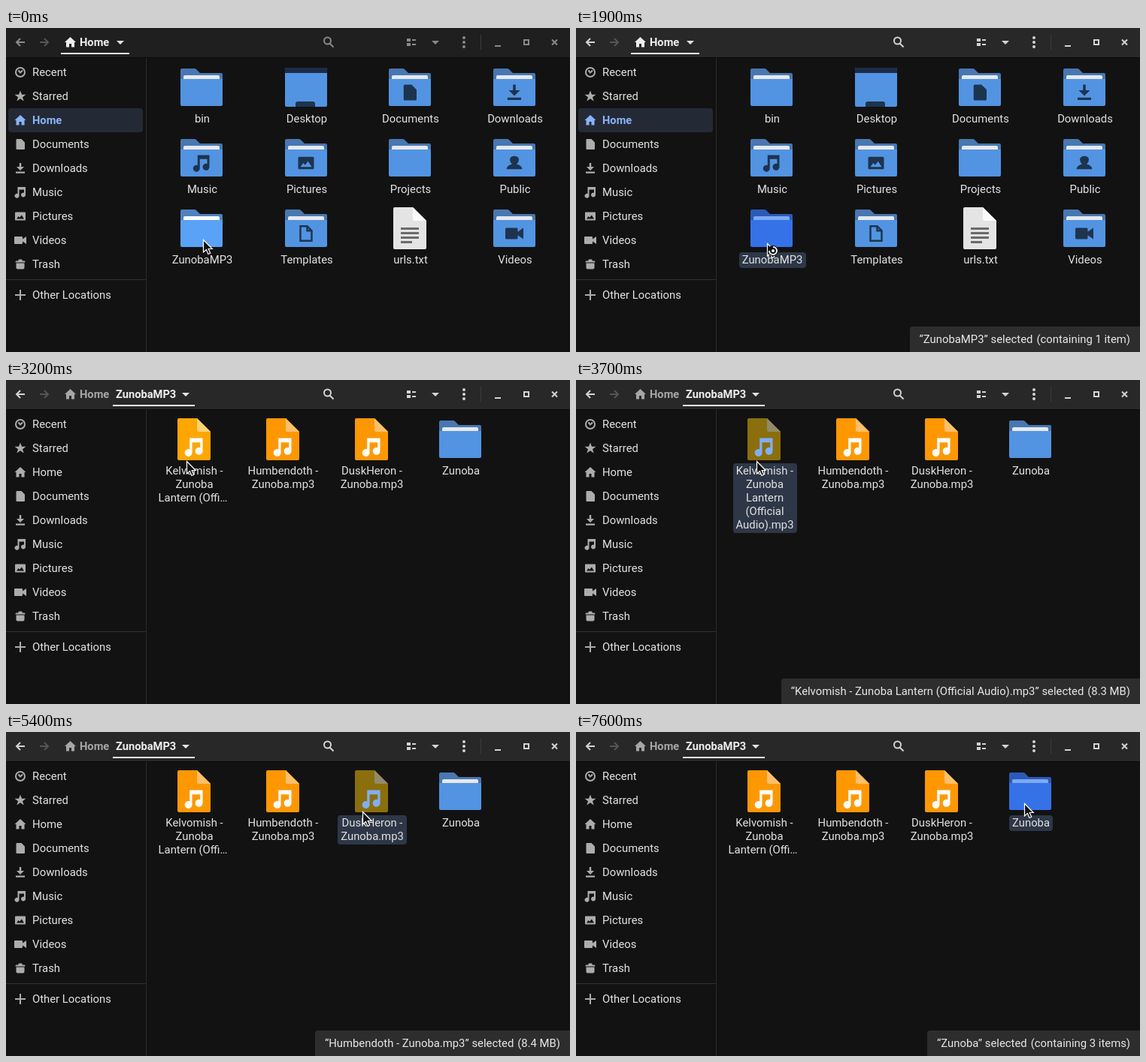
Animation, 750 px wide and 432 px high, one loop 8000 ms. Source, as an HTML page with a canvas:

```html
<!DOCTYPE html>
<html lang="en">
<head>
<meta charset="utf-8">
<title>File browser</title>
<style>
html, body { margin: 0; height: 100%; overflow: hidden; background: #121212; }
canvas { display: block; }
</style>
</head>
<body>
<canvas id="stage" width="750" height="432"></canvas>
<script>
const ctx = document.getElementById('stage').getContext('2d');
const LOOP = 8000, STEP = 100, OPEN = 2000;
const FONT = '14.85px Roboto, sans-serif', BOLD = '700 14.667px Roboto, sans-serif';

const glyphs = {
  home: 'M0-7L7.5 0H5.5V6.5H1.5V2H-1.5V6.5H-5.5V0H-7.5Z',
  star: 'M0-7.5L2-2.3H7.5L3 1.2 4.7 6.5 0 3.3-4.7 6.5-3 1.2-7.5-2.3H-2Z',
  document: 'M-4.5-7H1.5L6-2.5V6Q6 7 5 7H-4.5Q-5.5 7-5.5 6V-6Q-5.5-7-4.5-7Z',
  download: 'M-1.2-7H1.2V-2H5L0 3-5-2H-1.2ZM-6 4.5H6V6.7H-6Z',
  music: 'M-3.5-7H7V3.5A3 3 0 1 1 5 .7V-3.5H-1.5V4.8A3 3 0 1 1-3.5 2Z',
  picture: 'M-6-5.5H6Q7-5.5 7-4.5V4.5Q7 5.5 6 5.5H-6Q-7 5.5-7 4.5V-4.5Q-7-5.5-6-5.5ZM-5 3.5H5L1.8-1.5-.8 1.8-2.5 0Z',
  video: 'M-7-5H2Q3-5 3-4V-1.5L8-5V5L3 1.5V4Q3 5 2 5H-7Q-8 5-8 4V-4Q-8-5-7-5Z',
  trash: 'M-5.5-4.5H-3L-2-6.5H2L3-4.5H5.5Q6.5-4.5 6.5-2.5H-6.5Q-6.5-4.5-5.5-4.5ZM-5.5-1.5H5.5V4.5Q5.5 6.5 3.5 6.5H-3.5Q-5.5 6.5-5.5 4.5Z',
  person: 'M-4-3A4 3.2 0 0 1 4-3Q4-1 2 1Q6.5 2 7 5.5H-7Q-6.5 2-2 1Q-4-1-4-3Z',
  caret: 'M-5-2.5H5L0 2.5Z'
};
const lines = {
  clock: 'M6 0A6 6 0 1 1-6 0A6 6 0 1 1 6 0M-2.5-2.5L0 .5 3-2.5',
  plus: 'M-7 0H7M0-7V7',
  back: 'M6 0H-5M0-5L-5 0 0 5',
  forward: 'M-6 0H5M0-5L5 0 0 5',
  search: 'M3.5-1.5A4.5 4.5 0 1 1-5.5-1.5A4.5 4.5 0 1 1 3.5-1.5M2 2L7 7',
  close: 'M-3.5-3.5L3.5 3.5M3.5-3.5L-3.5 3.5',
  template: 'M-5-6.5H1L5-2.5V6.5H-5ZM1-6.5V-2.5H5'
};

const places = [
  ['Recent', 'clock'], ['Starred', 'star'], ['Home', 'home'], ['Documents', 'document'],
  ['Downloads', 'download'], ['Music', 'music'], ['Pictures', 'picture'], ['Videos', 'video'], ['Trash', 'trash']
];

const homeView = [
  ['bin'], ['Desktop', 'desktop'], ['Documents', 'document'], ['Downloads', 'download'],
  ['Music', 'music'], ['Pictures', 'picture'], ['Projects'], ['Public', 'person'],
  ['ZunobaMP3', '', '(containing 1 item)'], ['Templates', 'template'], ['urls.txt', 'text'], ['Videos', 'video']
].map(([name, kind, detail], i) => ({
  name, kind, detail, label: [name], x: [260, 399, 537, 676][i % 4], y: 79 + 94 * (i >> 2)
}));

const song = (x, name, label, detail, loaded, full) => ({ x, y: 79, kind: 'song', name, label, detail, loaded, full });
const folderView = [
  song(250, 'Kelvomish - Zunoba Lantern (Official Audio).mp3', ['Kelvomish -', 'Zunoba', 'Lantern (Offi…'], '(8.3 MB)', 2100,
    ['Kelvomish -', 'Zunoba', 'Lantern', '(Official', 'Audio).mp3']),
  song(368, 'Humbendoth - Zunoba.mp3', ['Humbendoth -', 'Zunoba.mp3'], '(8.4 MB)', 2400),
  song(486, 'DuskHeron - Zunoba.mp3', ['DuskHeron -', 'Zunoba.mp3'], '(6.4 MB)', 2800),
  { x: 604, y: 79, name: 'Zunoba', label: ['Zunoba'], detail: '(containing 3 items)' }
];

// [time, selected item]
const selections = [
  [0, null], [400, homeView[8]], [OPEN, null], [3500, folderView[0]],
  [4500, folderView[1]], [5400, folderView[2]], [6800, folderView[3]]
];
// [time, x, y] of the pointer tip
const pointerPath = [
  [0, 262, 282], [100, 250, 277], [200, 246, 279], [600, 246, 279], [900, 254, 286], [2300, 254, 288],
  [2400, 270, 290], [2700, 270, 290], [3000, 252, 165], [3200, 240, 108], [3800, 240, 108], [4000, 280, 150],
  [4100, 318, 148], [4300, 352, 108], [4700, 352, 108], [5000, 425, 120], [5300, 474, 106], [5600, 474, 106],
  [6000, 540, 112], [6400, 601, 94], [6500, 602, 95], [7000, 602, 95], [7300, 598, 84], [7600, 596, 95], [LOOP, 596, 95]
];

const selectedAt = t => selections.filter(s => s[0] <= t).pop()?.[1] ?? null;

function pointerAt(t) {
  const i = pointerPath.findIndex(p => p[0] > t);
  const [t0, x0, y0] = pointerPath[i - 1], [t1, x1, y1] = pointerPath[i];
  const k = (t - t0) / (t1 - t0);
  return [Math.round(x0 + (x1 - x0) * k), Math.round(y0 + (y1 - y0) * k)];
}

function rect(x, y, w, h, color, radius = 0) {
  ctx.fillStyle = color;
  ctx.beginPath();
  ctx.roundRect(x, y, w, h, radius);
  ctx.fill();
}

function shape(d, x, y, fill, stroke, width = 2, scale = 1) {
  const path = new Path2D(d);
  ctx.save();
  ctx.translate(x, y);
  ctx.scale(scale, scale);
  ctx.lineWidth = width;
  if (fill) { ctx.fillStyle = fill; ctx.fill(path, 'evenodd'); }
  if (stroke) { ctx.strokeStyle = stroke; ctx.stroke(path); }
  ctx.restore();
}

function symbol(name, x, y, color, scale = 1) {
  if (glyphs[name]) shape(glyphs[name], x, y, color, null, 0, scale);
  else shape(lines[name], x, y, null, color, 2 / Math.sqrt(scale), scale);
}

function text(str, x, y, color = '#e2e2e2', align = 'left', font = FONT) {
  ctx.font = font;
  ctx.textAlign = align;
  ctx.fillStyle = color;
  ctx.fillText(str, x, y);
}

function textWidth(str) {
  ctx.font = FONT;
  return ctx.measureText(str).width;
}

function drawHeader(focus, inFolder) {
  const shade = Math.round(31 + 9 * focus);
  rect(0, 0, 750, 39, `rgb(${shade},${shade},${shade})`);
  rect(0, 39, 750, 1, '#0b0b0b');
  const level = Math.round(138 + 74 * focus), ink = `rgb(${level},${level},${level})`;
  symbol('back', 19, 19, ink);
  symbol('forward', 51, 19, '#565656');
  const crumb = inFolder ? '#a6a6a6' : '#eeeeee';
  symbol('home', 85.5, 19, crumb);
  text('Home', 98, 24, crumb, 'left', BOLD);
  if (inFolder) text('ZunobaMP3', 146, 24, '#eeeeee', 'left', BOLD);
  symbol('caret', inFolder ? 239 : 152, 19.5, '#e4e4e4');
  rect(inFolder ? 142 : 73, 33, inFolder ? 109 : 91, 2, '#eeeeee');

  symbol('search', 428.5, 18.5, ink);
  for (const y of [14, 20]) {
    rect(533, y, 5, 4, ink);
    rect(540, y + 1, 5, 2, ink);
  }
  symbol('caret', 571, 19.5, ink);
  for (const y of [13, 19, 25]) rect(607, y - 2, 4, 4, ink, 2);
  rect(631, 9, 1, 20, '#3c3c3c');
  rect(650, 23, 8, 2, ink);
  shape('M-3-3H3V3H-3Z', 692, 19, null, ink);
  symbol('close', 729.5, 19, ink);
}

function drawSidebar(inFolder) {
  rect(186, 40, 1, 392, '#2c2c2c');
  rect(0, 335, 186, 1, '#303030');
  places.forEach(([name, icon], i) => {
    const y = 59 + 32 * i, active = name === 'Home' && !inFolder;
    if (active) rect(3, y - 16, 179, 32, '#242a35', 4);
    symbol(icon, 19, y, active ? '#8ab2f8' : '#acacac');
    text(name, 35, y + 5, active ? '#8ab2f8' : '#e2e2e2', 'left', active ? BOLD : FONT);
  });
  symbol('plus', 19, 356, '#acacac');
  text('Other Locations', 35, 361);
}

function drawFolder(x, y, selected, emblem) {
  const [back, paper, front] = selected ? ['#2a5bb9', '#7ca9f1', '#3572e8'] : ['#4877b1', '#e6e8ec', '#5294e2'];
  shape('M-26-25H-9.5Q-8-25-7-24L-2-19H26Q28-19 28-17V10H-28V-23Q-28-25-26-25Z', x, y, back);
  rect(x - 24, y - 16, 48, 10, paper, 2);
  rect(x - 28, y - 11, 56, 36, front, [0, 0, 2, 2]);
  if (emblem) symbol(emblem, x, y + 7, '#1d344f', 1.5);
}

function drawPage(x, y, page, fold) {
  shape('M-20-28H4L22-10V26Q22 28 20 28H-20Q-22 28-22 26V-26Q-22-28-20-28Z', x, y, page);
  shape('M4-28L22-10H6Q4-10 4-12Z', x, y, fold);
}

function drawIcon(item, t, selected) {
  const { x, y, kind } = item;
  if (kind === 'song' && t < item.loaded) {
    for (let i = 0; i < 4; i++) rect(x - 19, y - 19 + 11 * i, 38, 5, '#dedede');
  } else if (kind === 'song') {
    drawPage(x, y, selected ? '#8a6f0c' : '#ff9800', selected ? '#938a6a' : '#ffc06a');
    symbol('music', x, y + 10, selected ? '#82aef5' : '#ffffff', 1.65);
  } else if (kind === 'text') {
    drawPage(x, y, '#e4e4e4', '#fafafa');
    for (let i = 0; i < 4; i++) rect(x - 12, y - 1 + 6 * i, i < 3 ? 24 : 15, 3, '#6a6a6a');
  } else if (kind === 'desktop') {
    rect(x - 28, y - 26, 56, 52, '#5294e2', 2);
    rect(x - 28, y - 26, 56, 7, '#1c2c48', [2, 2, 0, 0]);
    rect(x - 14, y + 19, 26, 7, '#1d344f', [3, 3, 0, 0]);
  } else {
    drawFolder(x, y, selected, kind);
  }
}

function drawItem(item, t, selected, hovered) {
  ctx.filter = hovered && !selected ? 'brightness(1.1)' : 'none';
  drawIcon(item, t, selected);
  ctx.filter = 'none';
  const rows = selected && item.full || item.label;
  const center = item.x + (selected || rows.length < 2 ? 1 : 0.5);
  if (selected) {
    const w = Math.round(Math.max(...rows.map(textWidth)) + 8);
    rect(Math.round(center - w / 2), item.y + 32, w, 18 * rows.length + 3, '#2d3747', 4);
  }
  rows.forEach((row, i) => text(row, center - (row.endsWith('…') ? 2 : 0), item.y + 47 + 18 * i, '#e2e2e2', 'center'));
}

function drawStatus({ name, detail }) {
  const message = `“${name}” selected`, split = 737 - textWidth(detail) - 5;
  const left = Math.round(split - textWidth(message) - 13);
  rect(left, 398, 750 - left, 34, '#2d2d2d', [4, 0, 0, 0]);
  text(message, split, 420, '#e8e8e8', 'right');
  text(detail, 737, 420, '#e8e8e8', 'right');
}

function drawPointer(x, y, busy) {
  shape('M0 0V16.5L3.9 13 6.4 19 9.2 17.8 6.7 12H11.8Z', x + 0.5, y + 0.5, '#111111', '#ffffff', 1.2);
  if (!busy) return;
  rect(x + 1, y + 3, 14, 14, '#111111', 7);
  shape('M0-5A5 5 0 1 1-5 0', x + 8, y + 10, null, '#f4f4f4');
  rect(x + 6, y + 8, 4, 4, '#f4f4f4', 2);
}

function draw(t) {
  const inFolder = t >= OPEN, view = inFolder ? folderView : homeView;
  const focus = Math.min(1, Math.max(0, (t - 300) / 300));
  const [px, py] = pointerAt(t), selected = selectedAt(t), status = selectedAt(t - 200);
  rect(0, 0, 750, 432, '#121212');
  drawHeader(focus, inFolder);
  drawSidebar(inFolder);
  for (const item of view) {
    const hovered = Math.abs(px - item.x) < 46 && py > item.y - 28 && py < item.y + 32 + 18 * item.label.length;
    drawItem(item, t, item === selected, hovered);
  }
  if (view.includes(status)) drawStatus(status);
  drawPointer(px, py, t >= 1900 && t < OPEN);
}

const start = performance.now();
function tick() {
  const t = (performance.now() - start) % LOOP;
  draw(Math.floor(t / STEP) * STEP);
  requestAnimationFrame(tick);
}
tick();
</script>
</body>
</html>
```
